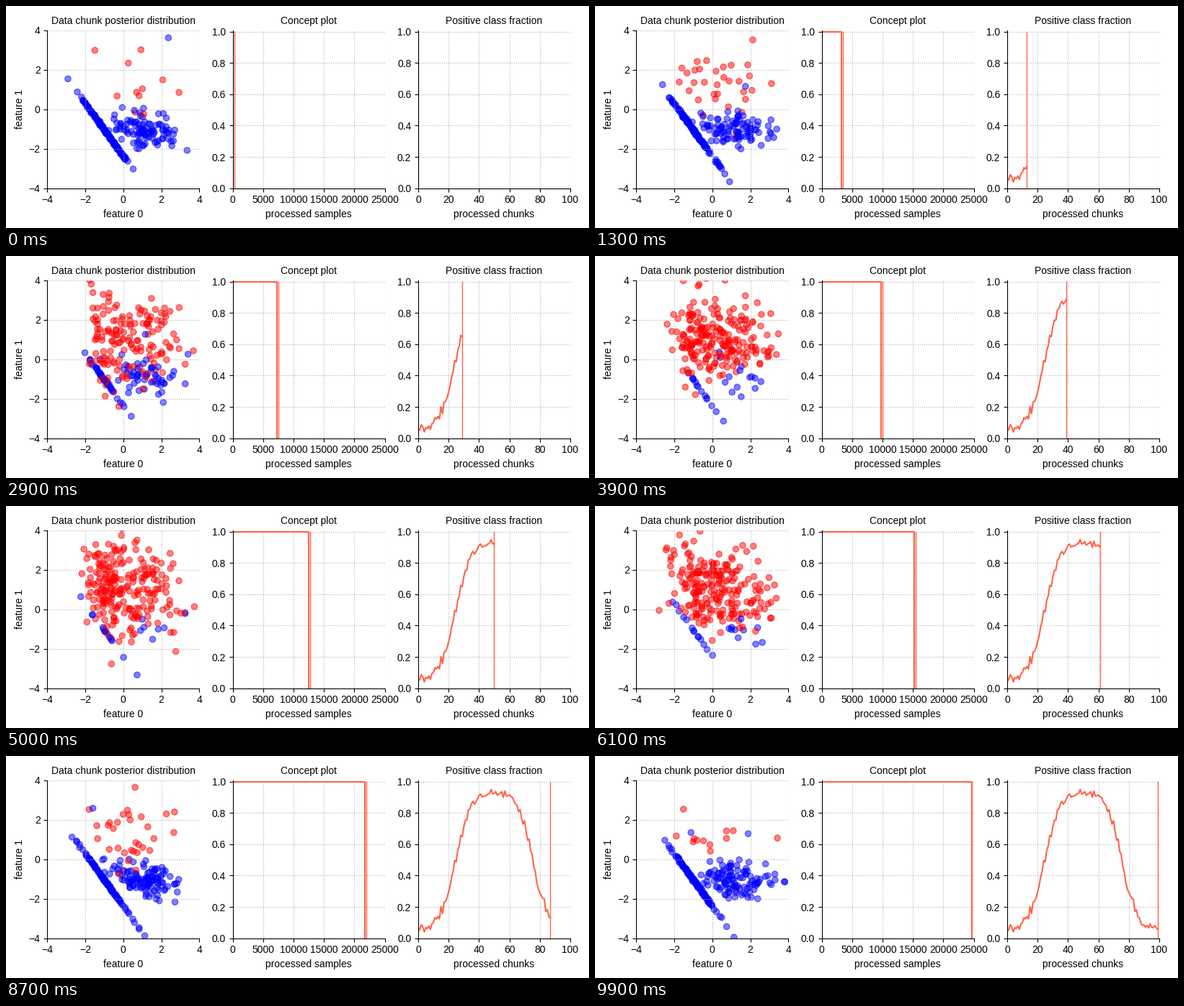
Animation, 809 px wide and 309 px high, one loop 10 s. Source, as a matplotlib script:

```python
import matplotlib.pyplot as plt
import numpy as np
from matplotlib.animation import FuncAnimation

W, H, DPI = 809, 309, 100
CHUNKS, SIZE = 100, 250

plt.rcParams.update({"font.family": "Liberation Sans", "font.size": 10,
                     "axes.titlesize": 10, "axes.labelsize": 10})


def sigmoid(x):
    return 1 / (1 + np.exp(-x))


# positive share: rises, holds and falls again, with sampling noise
steps = np.arange(CHUNKS)
drift = sigmoid((steps - 24.5) / 5) - sigmoid((steps - 75.5) / 5)
fraction = .05 + .89 * drift + np.random.default_rng(4).normal(0, .016, CHUNKS)
fraction = fraction.clip(.04, .95)


def negatives(rng, n):
    """A thin diagonal streak and a flat round cloud."""
    u, v = rng.normal(size=(2, n))
    streak = np.c_[-1 + .65 * u, -1.05 - .86 * u + .04 * v]
    cloud = np.c_[1.15 + .95 * u, -1 - .12 * u + .43 * v]
    return np.where(rng.random((n, 1)) < .53, streak, cloud)


def positives(rng, n):
    """Two broad, overlapping clouds."""
    u, v = rng.normal(size=(2, n))
    left = np.c_[-.8 + .65 * u, 1.05 - .3 * u + 1.1 * v]
    right = np.c_[1.15 + 1.1 * u, 1 - .15 * u + 1.05 * v]
    return np.where(rng.random((n, 1)) < .5, left, right)


def chunk(i):
    rng = np.random.default_rng(1000 + i)
    label = rng.permutation(SIZE) < round(SIZE * fraction[i])
    truth = label ^ (rng.random(SIZE) < .012)  # a few mislabelled samples
    points = np.where(truth[:, None], positives(rng, SIZE), negatives(rng, SIZE))
    colors = np.where(label[:, None], (1, 0, 0, .5), (0, 0, 1, .5))
    return points, colors


fig = plt.figure(figsize=(W / DPI, H / DPI), dpi=DPI, facecolor="white")


def panel(left, title, xlabel, xticks, yticks, ylim):
    ax = fig.add_axes([left / W, 55.4 / H, 210.9 / W, 220.1 / H])
    ax.set(title=title, xlabel=xlabel, xticks=xticks, yticks=yticks,
           xlim=(xticks[0], xticks[-1]), ylim=ylim)
    ax.grid(ls=":")
    ax.spines[["top", "right"]].set_visible(False)
    return ax


unit = np.linspace(0, 1, 6)
even = range(-4, 5, 2)
ax1 = panel(57.4, "Data chunk posterior distribution", "feature 0", even, even, (-4, 4))
ax1.set_ylabel("feature 1")
ax2 = panel(314.7, "Concept plot", "processed samples",
            range(0, 25001, 5000), unit, (0, 1.01))
ax3 = panel(572, "Positive class fraction", "processed chunks",
            range(0, 101, 20), unit, (0, 1.01))

dots = ax1.scatter([], [])
concept, = ax2.plot([], [], c="tomato")
cursor2, = ax2.plot([], [], c="tomato", lw=1)
curve, = ax3.plot([], [], c="tomato")
cursor3, = ax3.plot([], [], c="tomato", lw=1)


def draw(i):
    points, colors = chunk(i)
    dots.set_offsets(points)
    dots.set_facecolors(colors)
    dots.set_edgecolors(colors)
    start, end = i * SIZE, (i + 1) * SIZE
    concept.set_data([0, start, start] if i else [], [1, 1, 0] if i else [])
    cursor2.set_data([end, end], [0, 1])
    curve.set_data(steps[:i + 1], fraction[:i + 1])
    cursor3.set_data([i, i], [0, 1])
    return dots, concept, cursor2, curve, cursor3


anim = FuncAnimation(fig, draw, frames=CHUNKS, interval=100, repeat=True, repeat_delay=0)
plt.show()
```
